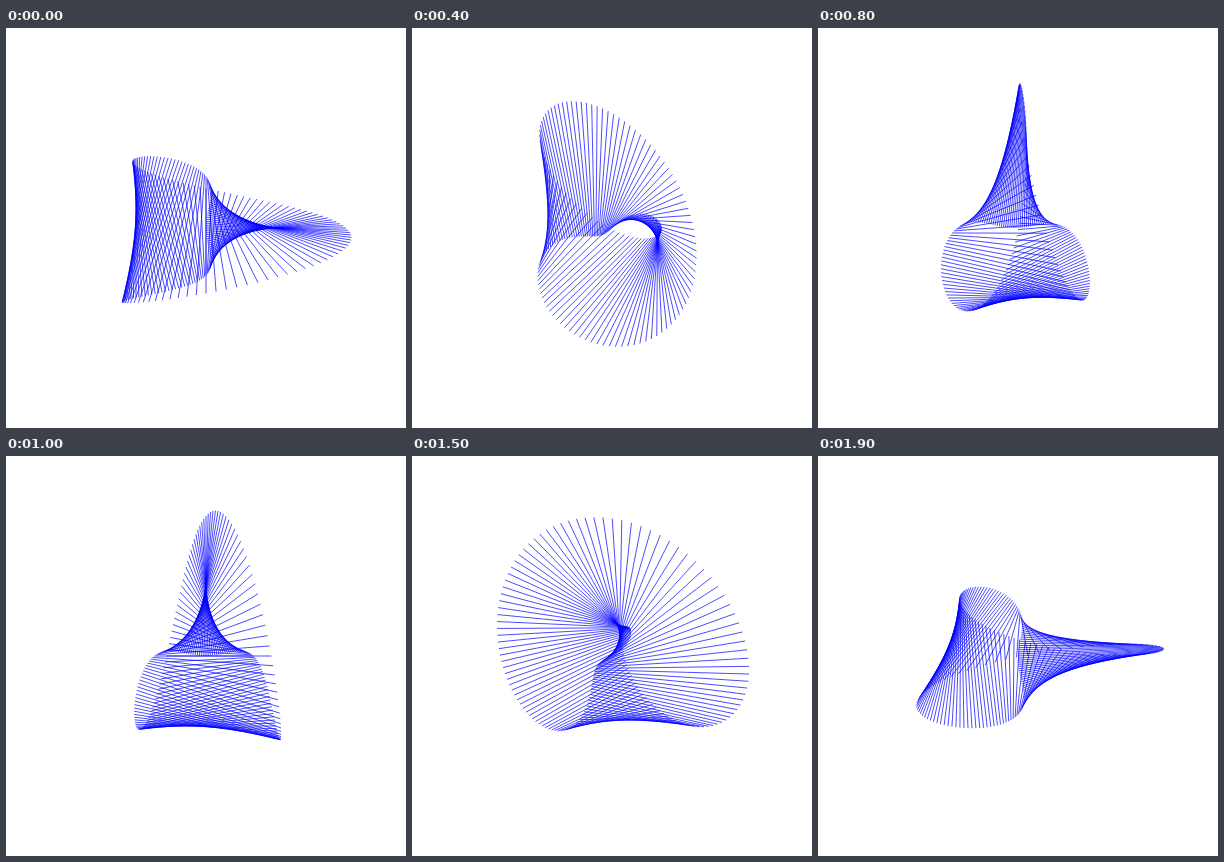
Animation, 400 px wide and 400 px high, one loop 2 s. Source, as an HTML page with a canvas:

```html
<!DOCTYPE html>
<html lang="en">
<head>
<meta charset="utf-8">
<title>Rotating Möbius strip</title>
<style>
  html, body { margin: 0; width: 100%; height: 100%; overflow: hidden; background: #fff; }
  canvas { display: block; width: 400px; height: 400px; }
</style>
</head>
<body>
<canvas id="stage" width="400" height="400"></canvas>
<script>
const ctx = document.getElementById('stage').getContext('2d');
const LOOP = 2000, STEP = 100, RULINGS = 100;
const CENTER = 200, SCALE = 70, CAMERA = 7;

// Point on the strip: u runs around the ring, v across it.
function strip(u, v) {
  const r = 1 + v * Math.cos(u / 2);
  return [r * Math.cos(u), r * Math.sin(u), v * Math.sin(u / 2)];
}

// Rotation about the screen diagonal, from the quaternion (cos h, sin h, sin h, 0).
function orientation(h) {
  const a = Math.cos(h), b = Math.sin(h), n = a * a + 2 * b * b;
  const near = a * a / n, far = 2 * b * b / n, side = 2 * a * b / n;
  const cos = near - far;
  const p = (1 + cos) / 2, q = (1 - cos) / 2;
  return ([x, y, z]) => [
    p * x + side * y - q * z,
    q * x - side * y - p * z,
    -side * x + cos * y - side * z
  ];
}

function project([x, y, z]) {
  const k = SCALE * CAMERA / (CAMERA - z);
  return [CENTER + k * x, CENTER - k * y];
}

function draw(time) {
  const turn = Math.floor((time % LOOP) / STEP) * STEP / LOOP;
  const rotate = orientation(Math.PI * turn);
  ctx.fillStyle = '#fff';
  ctx.fillRect(0, 0, 400, 400);
  ctx.strokeStyle = '#00f';
  ctx.lineWidth = 0.7;
  for (let i = 0; i < RULINGS; i++) {
    const u = 2 * Math.PI * i / RULINGS;
    ctx.beginPath();
    ctx.moveTo(...project(rotate(strip(u, -1))));
    ctx.lineTo(...project(rotate(strip(u, 1))));
    ctx.stroke();
  }
}

const start = performance.now();
function tick() {
  draw(performance.now() - start);
  requestAnimationFrame(tick);
}
tick();
</script>
</body>
</html>
```
